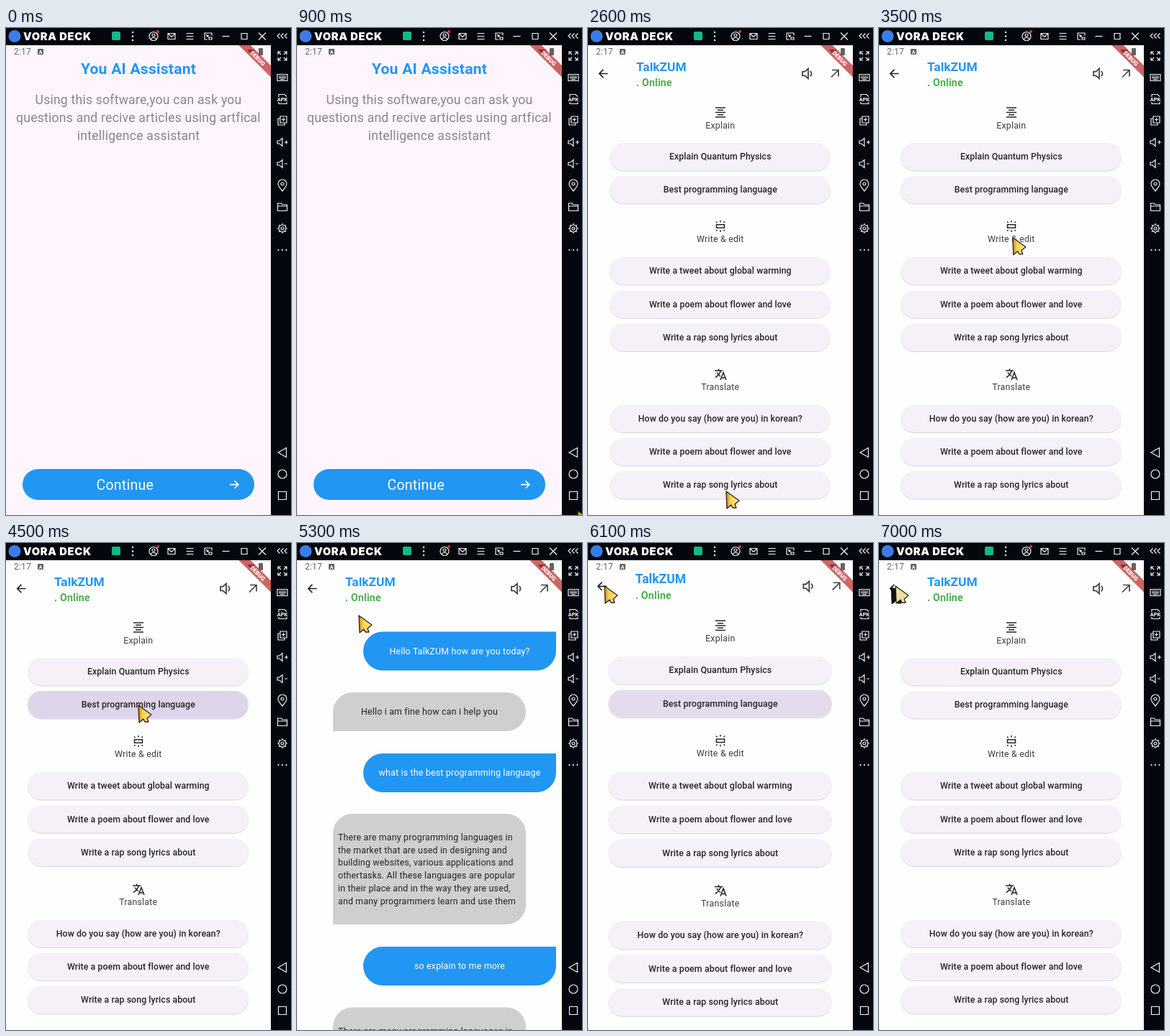
Write an HTML page that moves like this. It is 396x678 px and loops after 7200 ms.

```html
<!DOCTYPE html>
<html lang="en">
<head>
<meta charset="utf-8">
<title>Assistant app demo</title>
<style>
html, body { margin: 0; width: 100%; height: 100%; overflow: hidden; background: #04080e; }
svg { display: block; width: 396px; height: 678px; font-family: Roboto, sans-serif; }
.body { font-size: 12.32px; letter-spacing: .22px; }
.label { font-size: 12.32px; font-weight: 500; letter-spacing: .088px; }
.line { fill: none; stroke-width: 1.2; }
</style>
</head>
<body>
<svg id="stage" viewBox="0 0 396 678"></svg>
<script>
const APP = 'TalkZUM';
const BLUE = '#2196f3', INK = '#262429';

const rect = (x, y, w, h, fill, more = '') =>
  `<rect x="${x}" y="${y}" width="${w}" height="${h}" fill="${fill}" ${more}/>`;
const text = (x, y, content, fill, more = '', anchor = 'middle') =>
  `<text x="${x}" y="${y}" fill="${fill}" text-anchor="${anchor}" ${more}>${content}</text>`;
const icon = (x, y, d, color = '#eef1f4', more = '') =>
  `<path class="line" transform="translate(${x} ${y})" d="${d}" stroke="${color}" ${more}/>`;
const dot = (x, y, r, fill) => `<circle cx="${x}" cy="${y}" r="${r}" fill="${fill}"/>`;
const page = (id, color, content) => `<g id="${id}">${rect(0, 24, 368, 654, color)}${content}</g>`;

function homePage() {
  const lines = ['Using this software,you can ask you',
    'questions and recive articles using artfical', 'intelligence assistant'];
  return page('home', '#fff5ff',
    text(184, 64, 'You AI Assistant', BLUE, 'font-size="21.1" font-weight="700" letter-spacing=".22"') +
    lines.map((s, i) => text(184, 106 + i * 25.2, s, '#89848d', 'font-size="17.6" letter-spacing=".22"')).join('') +
    rect(23, 614, 322, 43, BLUE, 'rx="21.5"') +
    text(165.3, 643, 'Continue', '#fff', 'font-size="19.5" letter-spacing=".25"') +
    icon(317, 635.7, 'M-6 0H5.5M.5-5.3L5.8 0L.5 5.3', '#fff', 'style="stroke-width:1.7"'));
}

function header() {
  return text(67, 59.5, APP, BLUE, 'font-size="17.4" font-weight="700"', 'start') +
    text(67, 81, '. Online', '#4caf50', 'font-size="14.08" font-weight="700" letter-spacing=".2"', 'start') +
    icon(21, 63.5, 'M6.5 0H-5M.3-5.6L-5.3 0L.3 5.6', INK, 'style="stroke-width:1.7"') +
    icon(305, 63.5, 'M-7-2.8H-3.5L1-7V7L-3.5 2.8H-7ZM3.7-3.6Q7.5 0 3.7 3.6', '#444', 'style="stroke-width:1.8"') +
    icon(343, 63.5, 'M-5 5L4.5-4.5M-4-5H5V4', '#444', 'style="stroke-width:1.7"');
}

function section(y, title, iconPath, buttons) {
  const rows = buttons.map(([centre, label]) =>
    rect(30, centre - 18.2, 307, 38.6, '#dcd5e2', 'rx="19.3"') +
    rect(30, centre - 19, 307, 38.4, '#f6f0f9', 'rx="19.2"') +
    (centre === 225 ? rect(30, 206, 307, 38.4, '#ddd5e9', 'rx="19.2" id="pressed"') : '') +
    text(183.8, centre + 4.2, label, INK, 'class="label"'));
  return icon(184, y, iconPath, INK, 'style="stroke-width:1.5"') +
    text(183.8, y + 22, title, '#403d43', 'class="body"') + rows.join('');
}

function listPage() {
  const poem = 'Write a poem about flower and love', rap = 'Write a rap song lyrics about';
  return page('list', '#fefefe', header() +
    section(117.5, 'Explain', 'M-7-6.5H7M-4-3.2H4M-7 0H7M-4 3.2H4M-7 6.5H7',
      [[179, 'Explain Quantum Physics'], [225, 'Best programming language']]) +
    section(276, 'Write &amp; edit', 'M-5.5-2.2H5.5V2.2H-5.5ZM0-8V-5.5M0 8V5.5M-6-6.5L-4.5-5M6-6.5L4.5-5M-6 6.5L-4.5 5M6 6.5L4.5 5',
      [[338, 'Write a tweet about global warming'], [384.3, poem], [430.5, rap]]) +
    section(482, 'Translate', 'M-8-5H3M-2.5-7.5V-5M.5-5Q-1.5 1-7 4.5M-5-2.5Q-3 1 0 3M0 8L4-2.5L8 8M1.5 5H6.5',
      [[543.7, 'How do you say (how are you) in korean?'], [589.8, poem], [636, rap]]));
}

function bubble(y, h, mine) {
  const r = 27, x = mine ? 92 : 50, w = 268;
  const arc = (dx, dy) => `a${r} ${r} 0 0 1 ${dx} ${dy}`;
  const d = `M${x} ${y + r}${arc(r, -r)}` +
    (mine ? `H${x + w}V${y + h - r}` : `H${x + w - r}${arc(r, r)}V${y + h - r}`) + arc(-r, r) +
    (mine ? `H${x + r}${arc(-r, -r)}Z` : `H${x}Z`);
  return `<path d="${d}" fill="${mine ? BLUE : '#cfcfcf'}"/>`;
}

function chatPage() {
  const asked = (y, s) => bubble(y, 54, true) + text(226, y + 31, s, '#fff', 'class="body"');
  const story = ['There are many programming languages in', 'the market that are used in designing and',
    'building websites, various applications and', 'othertasks. All these languages are popular',
    'in their place and in the way they are used,', 'and many programmers learn and use them'];
  const answer = y => bubble(y, 154, false) +
    story.map((s, i) => text(57, y + 37 + i * 17.7, s, '#222', 'class="body"', 'start')).join('');
  return page('chat', '#fefefe', header() +
    asked(123.5, `Hello ${APP} how are you today?`) +
    bubble(208, 54, false) + text(184, 239, 'Hello i am fine how can i help you', '#222', 'class="body"') +
    asked(293, 'what is the best programming language') + answer(377) +
    asked(562, 'so explain to me more') + answer(646.5));
}

function statusBar() {
  return text(11, 37, '2:17', '#66616a', 'font-size="12" letter-spacing=".2"', 'start') +
    rect(44, 29, 8, 8, '#656068', 'rx="1"') + text(48, 36, 'A', '#fff', 'font-size="7" font-weight="700"') +
    '<path d="M335 30H346L340.5 37Z" fill="#554f55"/>' + rect(351, 28, 6, 10, '#656068', 'rx="1"') +
    '<g transform="translate(368 24) rotate(45)">' +
    rect(-40, 20, 80, 11.5, '#b71c1c', 'opacity=".67"') +
    text(0, 28.6, 'DEBUG', '#fff', 'font-size="8" font-weight="900"') + '</g>';
}

function titleBar() {
  return rect(0, 0, 396, 24, '#04080e') + dot(12, 11.5, 8.5, '#3b7de8') +
    text(24, 17, 'VORA DECK', '#fff', 'font-family="Inter, sans-serif" font-size="14.7" font-weight="900" letter-spacing=".7"', 'start') +
    rect(147, 5, 12, 12, '#12b886', 'rx="2"') +
    [6, 11.5, 17].map(y => dot(176, y, 1.2, '#fff')).join('') +
    icon(205, 11.5, 'M-6 0A6 6 0 1 1 6 0A6 6 0 1 1-6 0M-2-1.5A2 2 0 1 1 2-1.5A2 2 0 1 1-2-1.5M-4 4Q0-.5 4 4') +
    dot(211, 5, 2, '#e5323e') +
    icon(230, 11.5, 'M-5-4H5V4H-5ZM-5-4L0 1L5-4') +
    icon(255.5, 11.5, 'M-5-4H5M-5 0H5M-5 4H5') +
    icon(281, 11.5, 'M-1 4.5H-5V-4.5H5V-1M1 1.5H5V4.5H1ZM-3-2.5L0 .5M0-2V.5H-2.5') +
    icon(305.5, 11.5, 'M-5 0H5') + icon(331, 11.5, 'M-4-4H4V4H-4Z') + icon(356, 11.5, 'M-5-5L5 5M5-5L-5 5');
}

function sideBar() {
  const speaker = 'M-7-2H-4L0-5.5V5.5L-4 2H-7Z';
  const gear = Array.from({ length: 8 }, (_, i) => {
    const c = Math.cos(i * Math.PI / 4), s = Math.sin(i * Math.PI / 4);
    return `M${c * 5} ${s * 5}L${c * 7} ${s * 7}`;
  }).join('');
  const icons = [
    [11, 'M-3.5-3.5L-7 0L-3.5 3.5M1.5-3.5L-2 0L1.5 3.5M6.5-3.5L3 0L6.5 3.5'],
    [39, 'M-6-2V-6H-2M2-6H6V-2M6 2V6H2M-2 6H-6V2M-6-6L-2-2M6-6L2-2M6 6L2 2M-6 6L-2 2'],
    [69, 'M-7-4.5H7V4.5H-7ZM-5-2H5M-5 .3H5M-3 2.6H3'],
    [99, 'M-5-3V-6.5H3L6-3.5M-5 4V6.5H6V4'],
    [129, 'M-3-6H6V3H-3ZM-3-3H-6V6H3V3M1.5-4V1M-1-1.5H4'],
    [159, speaker + 'M3 0H8M5.5-2.5V2.5'],
    [189, speaker + 'M3 0H7'],
    [219, 'M0 8Q-6 1-6-2A6 6 0 0 1 6-2Q6 1 0 8ZM-2-2A2 2 0 1 1 2-2A2 2 0 1 1-2-2'],
    [249, 'M-6.5 5.5V-5H-1.5L0-3H6.5V5.5ZM-6.5-1H6.5'],
    [279, gear + 'M-5 0A5 5 0 1 1 5 0A5 5 0 1 1-5 0M-2 0A2 2 0 1 1 2 0A2 2 0 1 1-2 0'],
    [591, 'M5.5-6.5V6.5L-6 0Z'],
    [621, 'M-6 0A6 6 0 1 1 6 0A6 6 0 1 1-6 0Z'],
    [651, 'M-5.5-5.5H5.5V5.5H-5.5Z']
  ];
  return rect(368, 0, 28, 678, '#04080e') + icons.map(([y, d]) => icon(384, y, d)).join('') +
    text(384, 102, 'APK', '#fff', 'font-size="7.5" font-weight="700"') +
    [378.5, 384, 389.5].map(x => dot(x, 309, 1.1, '#fff')).join('');
}

const arrowShape = 'M0 0L1 24L7 19L9 23L14 23L12 18L18 13Z';
document.getElementById('stage').innerHTML = `
  <defs>
    <clipPath id="screen"><rect y="24" width="368" height="654"/></clipPath>
    <linearGradient id="gold"><stop stop-color="#b8851c"/><stop offset=".3" stop-color="#f7cf4e"/><stop offset="1" stop-color="#ffe98e"/></linearGradient>
  </defs>
  <g clip-path="url(#screen)">${homePage()}${rect(0, 24, 368, 654, '#000', 'id="listScrim"')}${listPage()}${rect(0, 24, 368, 654, '#000', 'id="chatScrim"')}${chatPage()}${statusBar()}</g>
  ${titleBar()}${sideBar()}
  <path id="ghost" d="${arrowShape}" fill="#111" stroke="#111" transform="translate(17 61)"/>
  <path id="cursor" d="${arrowShape}" stroke="#2a2418" stroke-width="1.3" stroke-linejoin="round"/>`;

const el = Object.fromEntries([...document.querySelectorAll('#stage [id]')].map(node => [node.id, node]));
const clamp = v => Math.min(1, Math.max(0, v));
const ease = p => 1 - (1 - p) ** 3;
const ramp = (v, from, to) => clamp((v - from) / (to - from));

// Pointer waypoints: time, x, y
const waypoints = [[900, 390, 672], [1500, 294, 586], [1600, 294, 586], [2000, 194, 640], [2600, 192, 645],
  [3000, 193, 558], [3700, 184, 226], [4800, 184, 226], [5300, 86, 101], [5700, 23, 60], [7200, 23, 60]];

function pointerAt(t) {
  const next = Math.max(1, waypoints.findIndex(w => w[0] > t));
  const [t0, x0, y0] = waypoints[next - 1], [t1, x1, y1] = waypoints[next];
  const p = ramp(t, t0, t1), k = p * p * (3 - 2 * p);
  return [x0 + (x1 - x0) * k, y0 + (y1 - y0) * k];
}

function place(node, scale, opacity) {
  node.setAttribute('transform', `translate(184 351) scale(${scale}) translate(-184 -351)`);
  node.setAttribute('opacity', opacity);
}

function draw(t) {
  const open = ramp(t, 2240, 2540), ask = ramp(t, 4540, 4840), back = ramp(t, 5944, 6244);
  const fadeIn = p => ramp(p, .125, .25);
  const scrim = p => p < 1 ? .6 * ramp(p, .2075, .4175) : 0;

  place(el.home, 1 + .05 * ease(open), open < 1 ? 1 : 0);
  el.listScrim.setAttribute('opacity', scrim(open));
  const listScale = back > 0 ? 1.1 - .1 * ease(back) : (.85 + .15 * ease(open)) * (1 + .05 * ease(ask));
  place(el.list, listScale, fadeIn(open));
  el.chatScrim.setAttribute('opacity', scrim(ask));
  if (back > 0) place(el.chat, 1 - .1 * ease(back), 1 - ramp(back, .0825, .2075));
  else place(el.chat, .85 + .15 * ease(ask), fadeIn(ask));

  el.pressed.setAttribute('opacity', ramp(t, 4250, 4500) * (1 - ease(ramp(t, 6050, 6500))));

  const [x, y] = pointerAt(t), late = t >= 7000;
  el.cursor.setAttribute('transform', `translate(${x} ${y})`);
  el.cursor.setAttribute('fill', late ? '#efe0a4' : 'url(#gold)');
  el.cursor.setAttribute('opacity', t >= 900 ? 1 : 0);
  el.ghost.setAttribute('opacity', late ? 1 : 0);
}

const start = performance.now();
function tick() {
  const t = (performance.now() - start) % 7200;
  draw(Math.floor(t / 100) * 100);
  requestAnimationFrame(tick);
}
tick();
</script>
</body>
</html>
```
